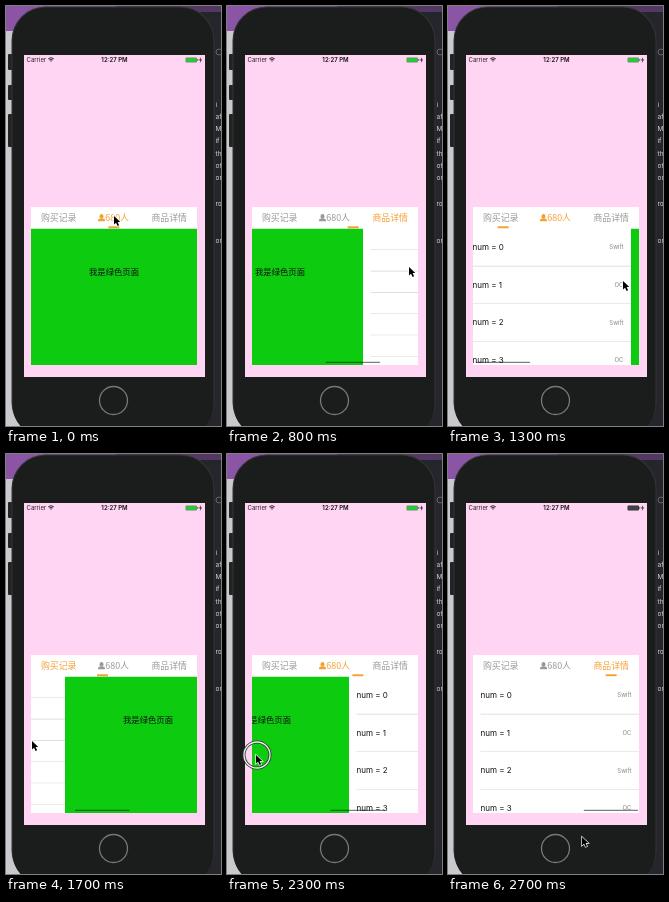
Recreate the animation shown at these times as an HTML page with a canvas. Size 215 px wide and 420 px high, loop 2800 ms.

```html
<!DOCTYPE html>
<html lang="zh">
<head>
<meta charset="utf-8">
<style>
html, body { margin: 0; width: 100%; height: 100%; overflow: hidden; background: #1b1c1c; }
canvas { display: block; width: 215px; height: 420px; }
</style>
</head>
<body>
<canvas></canvas>
<script>
const canvas = document.querySelector('canvas');
const c = canvas.getContext('2d');
const dpr = window.devicePixelRatio || 1;
canvas.width = 215 * dpr;
canvas.height = 420 * dpr;

const LOOP = 2800, STEP = 100, PAGE = 166, LEFT = 25, TOP = 222.5, BOTTOM = 359;
const ORANGE = '#f5a033', GREY = '#999';
const LATIN = 'Inter, "Liberation Sans", sans-serif';
const CJK = '"Noto Sans CJK SC", "Noto Sans CJK", sans-serif';

// time, scroll offset, pointer x, pointer y
const KEYS = [
  [0, 166, 108, 210], [200, 166, 150, 280], [400, 262, 54, 284], [500, 318, 40, 284],
  [600, 332, 71, 275], [700, 290, 113, 266], [800, 221, 182, 261], [900, 176, 172, 268],
  [1000, 166, 100, 280], [1100, 160, 66, 282], [1200, 70, 156, 278], [1300, 8, 175, 275],
  [1400, 0, 150, 284], [1500, 4, 126, 290], [1600, 80, 50, 288], [1700, 132, 26, 287],
  [1800, 160, 60, 292], [1900, 166, 98, 296], [2000, 208, 56, 295], [2400, 244, 20, 303],
  [2500, 272.5, 20, 303], [2600, 318, 80, 345], [2700, 332, 134, 383]
];
const TOUCHES = [[200, 400], [600, 700], [1100, 1200], [1500, 1600], [1900, 2400]];

function pose(t) {
  const i = KEYS.findLastIndex(k => k[0] <= t);
  const a = KEYS[i], b = KEYS[i + 1] || a;
  const p = b === a ? 0 : (t - a[0]) / (b[0] - a[0]);
  const [, offset, x, y] = a.map((v, n) => v + (b[n] - v) * p);
  const rest = KEYS.findLast(k => k[0] <= t && k[1] % PAGE === 0);
  return { offset, x, y, selected: rest[1] / PAGE };
}

function rect(x, y, w, h, fill, r = 0) {
  c.fillStyle = fill;
  c.beginPath();
  c.roundRect(x, y, w, h, r);
  c.fill();
}

function text(s, x, y, size, fill, { font = LATIN, align = 'left', weight = 400 } = {}) {
  c.font = `${weight} ${size}px ${font}`;
  c.textAlign = align;
  c.fillStyle = fill;
  c.fillText(s, x, y);
}

function circle(x, y, r, stroke, width) {
  c.beginPath();
  c.arc(x, y, r, 0, 7);
  c.strokeStyle = stroke;
  c.lineWidth = width;
  c.stroke();
}

function drawDesktop() {
  rect(0, 0, 215, 420, '#25252c');
  rect(0, 0, 110, 420, '#c9c9cd');
  rect(0, 0, 110, 25, '#8a55a4');
  rect(110, 0, 105, 6, '#533961');
  circle(213, 46, 3, '#777', 0.8);
  const code = [['i', 99], ['aft', 111], ['Mo', 123], ['if', 135], ['th', 148],
    ['ot', 160], ['or', 172], ['ro', 198], ['or', 235]];
  for (const [s, y] of code) text(s, 209.5, y + 2, 6.5, '#d5d5d8');
}

function drawPhone() {
  for (const [y, h] of [[48, 16], [79, 15], [108, 33]]) rect(2, y, 5, h, '#222325', 1);
  rect(5.5, 0.5, 203, 430, '#343536', 34);
  rect(6.5, 1.5, 201, 430, '#1b1c1c', 33);
  rect(18, 49, 181, 322, '#ffd5f3');
  circle(107.5, 394.5, 14, '#777879', 1.3);
}

function drawStatusBar(t) {
  text('Carrier', 20.5, 56.2, 6, '#222');
  text('12:27 PM', 108.5, 56.2, 6, '#111', { align: 'center', weight: 600 });
  c.strokeStyle = '#222';
  c.lineWidth = 0.9;
  for (const r of [1.2, 2.7, 4.2]) {
    c.beginPath();
    c.arc(45, 56, r, -2.3, -0.84);
    c.stroke();
  }
  const dark = t >= 2600;
  rect(179.5, 51.5, 11.5, 5, dark ? '#333' : '#6d8a6a', 1);
  rect(180.2, 52.2, 10.1, 3.6, dark ? '#444' : '#20cf35', 0.5);
  rect(191.4, 53, 0.8, 2, '#444');
  c.fillStyle = '#222';
  c.fill(new Path2D('M195 51.3l-2 3h1.4l-.6 2.6 2.3-3.3h-1.5z'));
}

function drawTabs(selected, offset) {
  rect(LEFT, 201, PAGE, 22, '#fff');
  const colour = i => i === selected ? ORANGE : GREY;
  const label = (s, x, i) => text(s, x, 215.3, 8.9, colour(i), { font: CJK });
  label('购买记录', 35, 0);
  label('680人', 99.3, 1);
  label('商品详情', 145.5, 2);
  c.fillStyle = colour(1);
  c.beginPath();
  c.ellipse(95.5, 210.4, 2, 2.4, 0, 0, 7);
  c.fill();
  rect(92, 212.5, 7, 2.8, colour(1), [2, 2, 0.5, 0.5]);
  rect(47 + offset / 3, 220.3, 11, 2, ORANGE);
}

function drawTable(x, empty) {
  rect(x, TOP, PAGE, BOTTOM - TOP, '#fff');
  const rowHeight = empty ? 21.3 : 37.6;
  for (let i = 0; i < 7; i++) {
    const y = TOP + i * rowHeight;
    rect(x + 7.5, y + rowHeight - 0.3, PAGE - 7.5, 0.6, '#d5d5d8');
    if (empty) continue;
    text(`num = ${i}`, x + 7.5, y + 21.6, 8, '#111');
    text(i % 2 ? 'OC' : 'Swift', x + PAGE - 7.5, y + 20.8, 6, '#888', { align: 'right' });
  }
}

function drawPages({ offset, selected }) {
  c.save();
  c.beginPath();
  c.rect(LEFT, TOP, PAGE, BOTTOM - TOP);
  c.clip();
  const x = LEFT - offset;
  const leaving = offset !== selected * PAGE;
  drawTable(x, selected === 0 && leaving);
  drawTable(x + 2 * PAGE, selected === 2 && leaving);
  rect(x + PAGE, TOP, PAGE, BOTTOM - TOP, '#0dcc10');
  text('我是绿色页面', x + PAGE + 58, 269.2, 8.35, '#111', { font: CJK });
  c.restore();
}

function drawPointer(x, y) {
  const arrow = new Path2D(`M${x} ${y}v8.5l2-1.8 1.6 3.3 1.5-.7-1.5-3.2h2.7z`);
  c.strokeStyle = '#fff';
  c.lineWidth = 1.3;
  c.stroke(arrow);
  c.fillStyle = '#000';
  c.fill(arrow);
}

function draw(t) {
  const state = pose(t);
  c.setTransform(dpr, 0, 0, dpr, 0, 0);
  drawDesktop();
  drawPhone();
  drawStatusBar(t);
  drawTabs(state.selected, state.offset);
  drawPages(state);
  if (t >= 200) rect(LEFT + state.offset / 3, 355.8, 54.5, 1.3, 'rgba(0,0,0,.5)', 0.6);
  if (TOUCHES.some(([from, to]) => t >= from && t < to)) {
    circle(state.x + 1, state.y, 13, '#333', 3);
    circle(state.x + 1, state.y, 13, '#e8f5e8', 1.3);
  }
  drawPointer(state.x, state.y);
}

const start = performance.now();
function tick() {
  const t = (performance.now() - start) % LOOP;
  draw(Math.floor(t / STEP) * STEP);
  requestAnimationFrame(tick);
}
tick();
</script>
</body>
</html>
```
